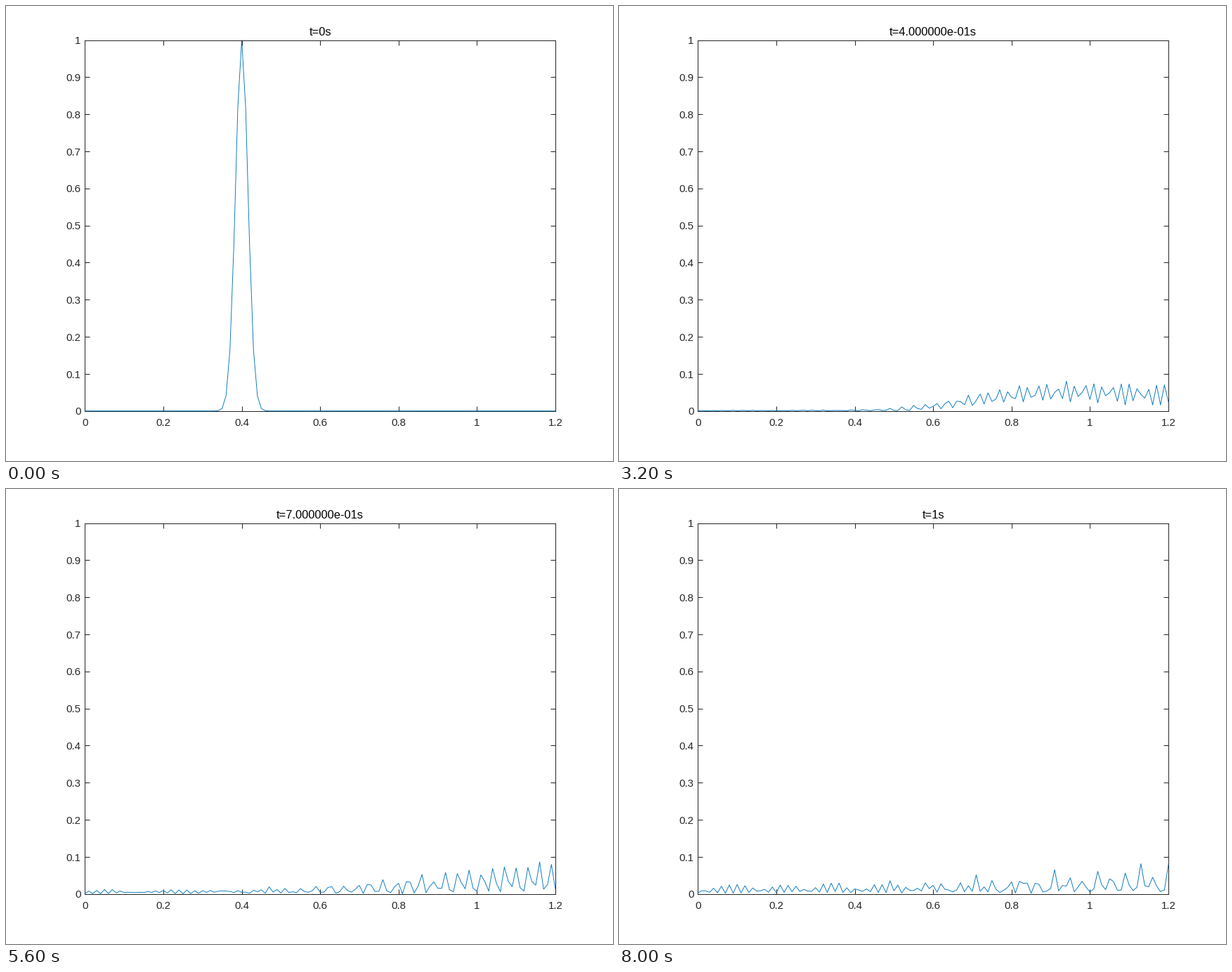
Write a matplotlib script that moves like this. It is 864x648 px and loops after 8.4 s.

```python
import numpy as np
import matplotlib.pyplot as plt
from matplotlib.animation import FuncAnimation

plt.rcParams["font.family"] = "Liberation Sans"

W, H, DPI = 864, 648, 108
FRAMES, INTERVAL = 21, 400
DX, DT, STEPS = 0.01, 0.001, 50      # STEPS time steps pass per frame
X0, K0 = 0.4, 200.0
INK, BLUE = (0.15, 0.15, 0.15), (0, 0.447, 0.741)

# Free wave packet between hard walls, stepped with Crank-Nicolson.
# The walls lie outside the visible range 0..1.2.
cells = np.arange(-35, 160)
x = cells * DX
n = len(x)
hop = np.full(n - 1, -0.5 / DX**2)
ham = np.diag(np.full(n, 1 / DX**2)) + np.diag(hop, 1) + np.diag(hop, -1)
energy, modes = np.linalg.eigh(ham)
step_phase = -2 * np.arctan(energy * DT / 2)
start = modes.T @ np.exp(-1000 * (x - X0) ** 2 + 1j * K0 * x)
shown = (cells >= 0) & (cells <= 120)


def density(frame):
    psi = modes @ (np.exp(1j * step_phase * STEPS * frame) * start)
    return np.abs(psi[shown]) ** 2


def time_label(frame):
    t = frame / (FRAMES - 1)
    return f"t={int(t)}s" if t == int(t) else f"t={t:e}s"


fig = plt.figure(figsize=(W / DPI, H / DPI), dpi=DPI, facecolor="white")
ax = fig.add_axes([0.13, 0.11, 0.775, 0.815])
ax.set_xlim(0, 1.2)
ax.set_ylim(0, 1)
x_ticks = np.arange(7) * 0.2
y_ticks = np.arange(11) * 0.1
ax.set_xticks(x_ticks)
ax.set_yticks(y_ticks)
ax.tick_params(direction="in", top=True, right=True, length=4.5, width=0.67,
               color=INK, labelbottom=False, labelleft=False)
for spine in ax.spines.values():
    spine.set_linewidth(0.67)
    spine.set_color(INK)


def put(px, py, text, size, color, ha):
    """Place text with its baseline at a pixel position from the top left."""
    return fig.text(px / W, 1 - py / H, text, fontsize=size, color=color,
                    ha=ha, va="baseline")


left, right, top, bottom = 0.13 * W, 0.905 * W, 0.075 * H, 0.89 * H
for v in x_ticks:
    put(left + (right - left) * v / 1.2, 598.5, f"{v:g}", 10, INK, "center")
for v in y_ticks:
    put(106.5, bottom - (bottom - top) * v + 5.6, f"{v:g}", 10, INK, "right")

title = put((left + right) / 2, 42, "", 11, "black", "center")
curve, = ax.plot(x[shown], density(0), color=BLUE, lw=0.6, zorder=3,
                 clip_on=False, solid_joinstyle="round")


def draw(frame):
    curve.set_ydata(density(frame))
    title.set_text(time_label(frame))
    return curve, title


anim = FuncAnimation(fig, draw, frames=FRAMES, interval=INTERVAL,
                     repeat=True, repeat_delay=0, blit=False)
plt.show()
```
